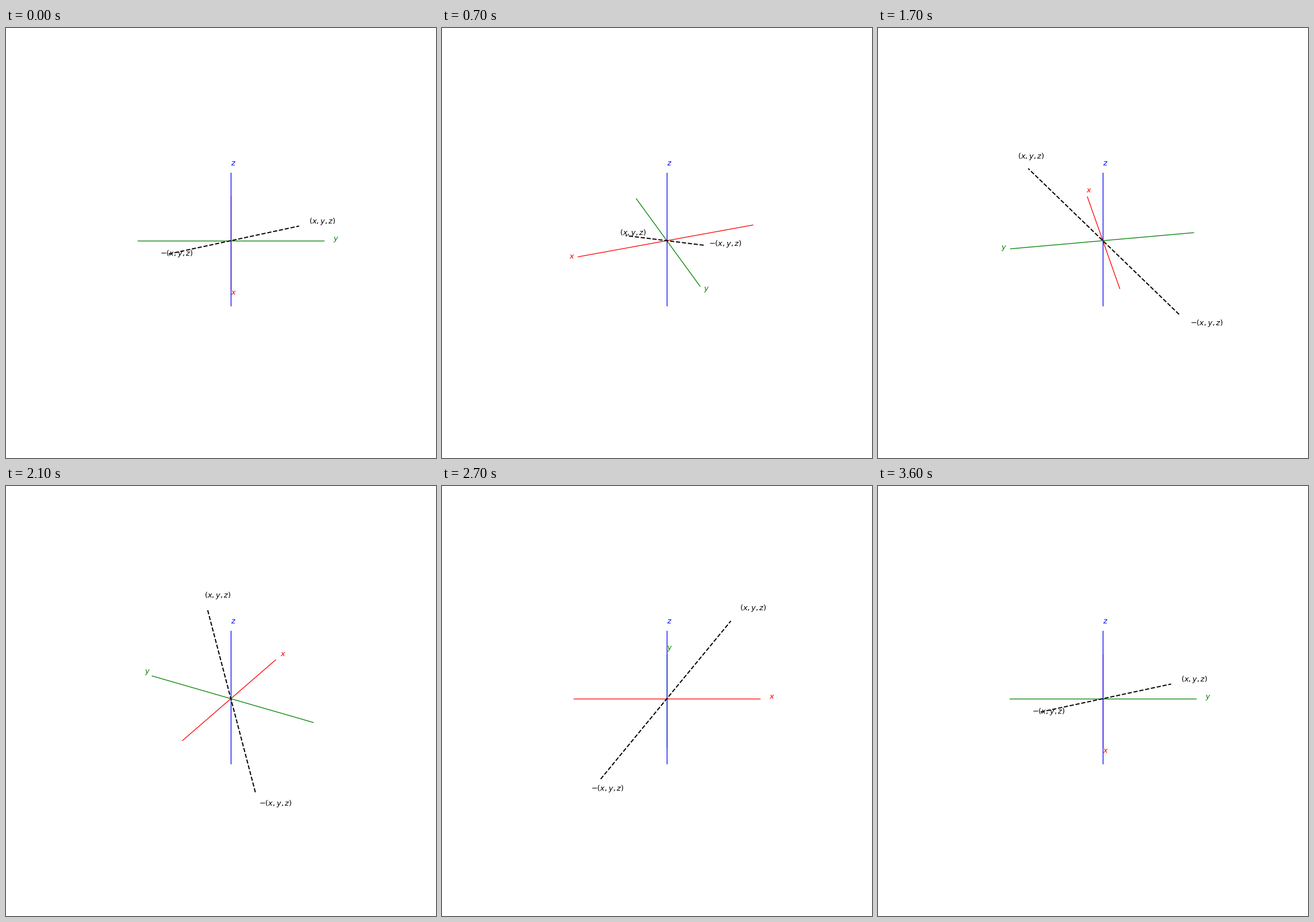
A matplotlib script that plays this animation: 748x748 px, repeating every 3700 ms.

```python
import numpy as np
import matplotlib.pyplot as plt
from matplotlib.animation import FuncAnimation

INCHES, DPI = 8, 93.5            # 748 by 748 pixels
SIZE = 800                       # drawing units along each side
FRAMES, STEP = 37, 10            # ten degrees of azimuth per frame
ELEV = np.radians(30)
DIST = 10                        # camera distance
FOCAL = 0.77 * SIZE * DIST / 1.85
ORIGIN = SIZE * (np.array([0.5125, 0.495]) + 0.77 * 0.025 / 1.85)
UNIT = 4 / 7 * np.array([1 / 1.1, 1 / 1.1, 0.75])   # world size of one data unit

fig = plt.figure(figsize=(INCHES, INCHES), dpi=DPI, facecolor="white")
ax = fig.add_axes([0, 0, 1, 1], xlim=(0, SIZE), ylim=(0, SIZE))
ax.axis("off")


def project(point, azim):
    """Perspective view of a data point, in units from the bottom left."""
    x, y, z = point * UNIT
    c, s = np.cos(azim), np.sin(azim)
    right, near = y * c - x * s, x * c + y * s
    up = z * np.cos(ELEV) - near * np.sin(ELEV)
    depth = near * np.cos(ELEV) + z * np.sin(ELEV)
    return ORIGIN + FOCAL * np.array([right, up]) / (DIST - depth)


lines, labels = [], []


def add_line(end, color, **style):
    line, = ax.plot([], [], color=color, **style)
    lines.append((line, np.array(end)))


def add_label(text, point, color):
    label = ax.text(0, 0, text, color=color, fontsize=10)
    labels.append((label, np.array(point)))


for name, color, axis in zip("xyz", "rgb", np.eye(3)):
    add_line(axis, color, lw=1)
    add_label(f"${name}$", 1.1 * axis, color)

diagonal = np.ones(3)
add_line(0.7 * diagonal, "k", lw=1.5, ls="--")
add_label("$(x,y,z)$", 0.8 * diagonal, "k")
add_label("$-(x,y,z)$", -0.8 * diagonal, "k")


def update(i):
    azim = np.radians(i * STEP % 360)
    for line, end in lines:
        line.set_data(*np.transpose([project(-end, azim), project(end, azim)]))
    for label, point in labels:
        label.set_position(np.round(project(point, azim)))   # whole units
    return [artist for artist, _ in lines + labels]


anim = FuncAnimation(fig, update, frames=FRAMES, interval=100, repeat=True)
plt.show()
```
